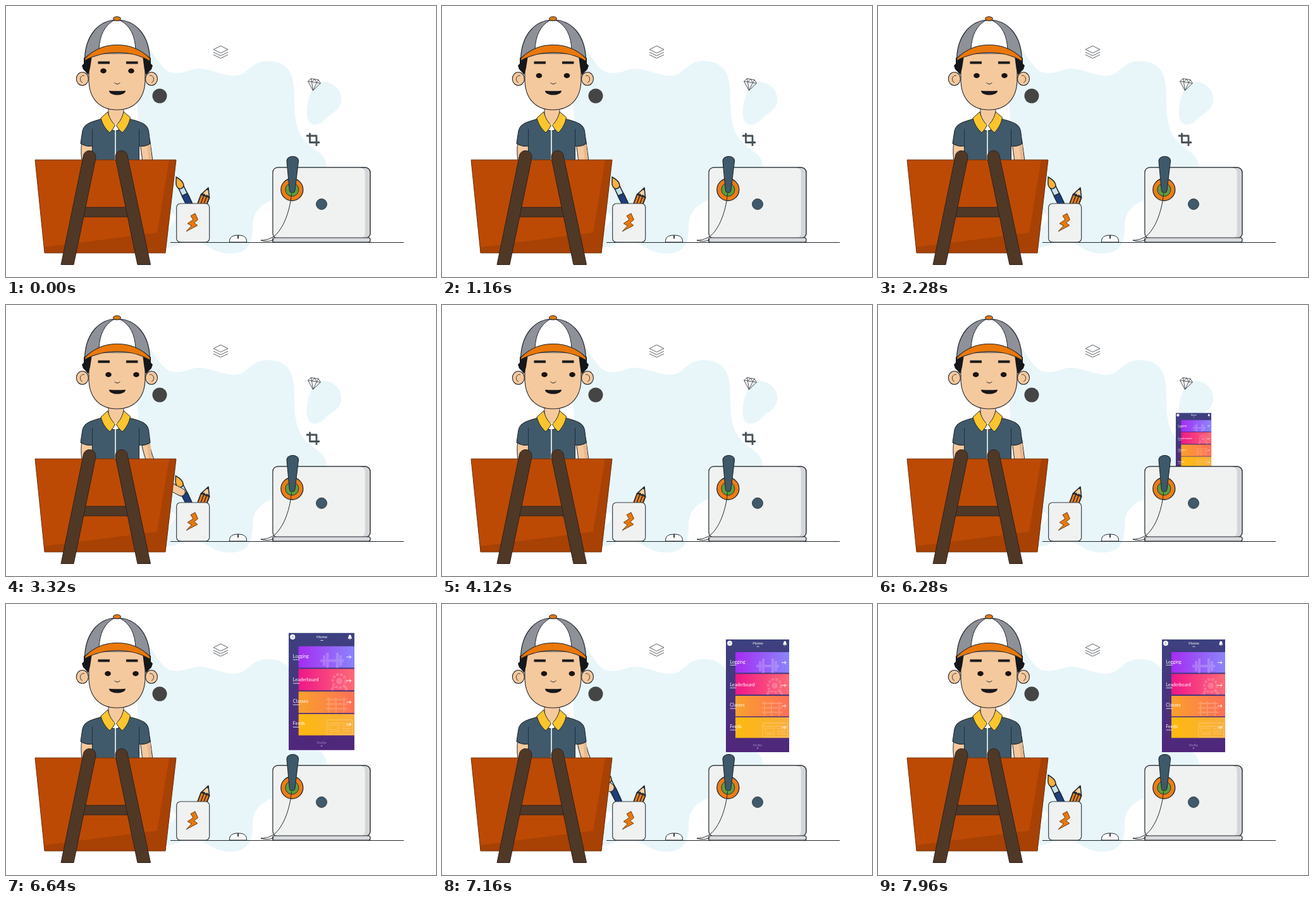
Recreate the animation shown at these times as an HTML page with a canvas. Size 680x428 px, loop 8 s.

```html
<!DOCTYPE html>
<html lang="en">
<head>
<meta charset="utf-8">
<title>Designer at work</title>
<style>
html, body { margin: 0; width: 100%; height: 100%; overflow: hidden; background: #fff; }
canvas { display: block; width: 680px; height: 428px; }
</style>
</head>
<body>
<canvas id="stage"></canvas>
<script>
const LOOP = 8000;
const canvas = document.getElementById('stage');
const ctx = canvas.getContext('2d');
const dpr = window.devicePixelRatio || 1;
canvas.width = 680 * dpr;
canvas.height = 428 * dpr;

const INK = '#22282d', SKIN = '#f5c99e', SKIN_DARK = '#e9b98d', SHIRT = '#405a6b',
  ORANGE = '#ea780a', BROWN = '#503827', PAPER = '#f0f2f1', SKY = '#e8f6fa';

const ease = p => (1 - Math.cos(Math.PI * p)) / 2;
const ramp = (t, a, b) => ease(Math.min(1, Math.max(0, (t - a) / (b - a))));
const mix = (a, b, p) => a + (b - a) * p;

// Eased value between [time, value] keys
function keyed(keys, t) {
  let i = 0;
  while (i < keys.length - 2 && t >= keys[i + 1][0]) i++;
  const [t0, a] = keys[i], [t1, b] = keys[i + 1];
  return mix(a, b, ramp(t, t0, t1));
}

function paint(path, fill, stroke, width = 1) {
  if (fill) { ctx.fillStyle = fill; ctx.fill(path); }
  if (stroke) { ctx.strokeStyle = stroke; ctx.lineWidth = width; ctx.stroke(path); }
}
const shape = (d, fill, stroke, width) => paint(new Path2D(d), fill, stroke, width);

function oval(x, y, rx, ry, fill, stroke, width) {
  const p = new Path2D();
  p.ellipse(x, y, rx, ry, 0, 0, Math.PI * 2);
  paint(p, fill, stroke, width);
}
function box(x, y, w, h, r, fill, stroke, width) {
  const p = new Path2D();
  p.roundRect(x, y, w, h, r);
  paint(p, fill, stroke, width);
}
function at(x, y, angle, draw) {
  ctx.save();
  ctx.translate(x, y);
  ctx.rotate(angle);
  draw();
  ctx.restore();
}
function gradient(x0, y0, x1, y1, a, b) {
  const g = ctx.createLinearGradient(x0, y0, x1, y1);
  g.addColorStop(0, a);
  g.addColorStop(1, b);
  return g;
}

function backdrop() {
  shape('M210 58 C237 64 240 105 268 106 C286 106 292 99 306 99 C328 100 345 112 364 110' +
    ' C384 108 386 87 414 87 C445 87 456 106 456 140 C455 190 464 206 480 220' +
    ' C496 232 512 240 506 262 L440 302 C408 307 391 322 390 346 C390 372 386 391 354 391' +
    ' C322 390 322 373 294 373 C270 373 268 384 250 380 C246 350 268 346 268 334' +
    ' C268 322 225 320 213 230 L207 150 Z', SKY);
  shape('M504 120 C520 121 533 136 530 151 C527 166 515 168 505 179 C494 190 478 192 476 174' +
    ' C474 155 482 121 504 120 Z', SKY);

  shape('M339.5 63 L351 68.7 L339.5 74.3 L328 68.7 Z M328 73 L339.5 78.5 L351 73' +
    ' M328 77 L339.5 82.5 L351 77', null, '#4b5257', 0.9);
  oval(243, 142, 11.5, 11.5, '#454545');
  at(487, 123.5, 0.16, () => shape('M-6 -8 L6 -8 L10 -3 L0 10 L-10 -3 Z M-10 -3 L10 -3' +
    ' M-6 -8 L-4 -3 L0 10 L4 -3 L6 -8 M-4 -3 L0 -8 L4 -3', null, '#454b50', 0.9));
  shape('M480.5 200.5 V215.5 H496 M475 205 H491 V221', null, '#475258', 2.8);
}

function dumbbell() {
  shape('M497 98 H533 M503 90 V106 M508 86 V109 M523 86 V109 M528 90 V106', null, '#fff', 4);
}
function medal() {
  ctx.setLineDash([4, 2]);
  oval(526, 129, 10, 10, null, '#fff', 4);
  ctx.setLineDash([]);
  oval(526, 129, 5, 5, '#fff');
  shape('M518 137 L514 143 M534 137 L538 143', null, '#fff', 4);
}
function planner() {
  shape('M506 157 H538 M506 164 H538 M506 171 H538 M510 154 V177 M521 154 V177 M533 154 V177', null, '#fff', 2);
}
function journal() {
  box(507, 188, 39, 22, 1, null, '#fff', 1.3);
  shape('M507 193 H546 M530 197 H543 M530 201 H543 M530 205 H543 M511 206 H526', null, '#fff', 1.3);
  box(511, 196, 14, 7, 0, null, '#fff', 1.3);
}

const CARDS = [
  ['Logging', 76, 93.5, '#a52cf2', '#8b85fb', dumbbell],
  ['Leaderboard', 110.5, 129.5, '#ef1688', '#ff6b76', medal],
  ['Classes', 145, 162, '#f9a12c', '#ff7058', planner],
  ['Feeds', 179, 196, '#fdb90f', '#f9ae3e', journal]
];

function label(text, x, y, size, color, align = 'left') {
  ctx.font = size + 'px Lato, sans-serif';
  ctx.textAlign = align;
  ctx.fillStyle = color;
  ctx.fillText(text, x, y);
}

// Rises from behind the laptop, overshoots, then settles
function phone(t) {
  const s = t < 6520 ? 1.115 * ramp(t, 6040, 6520) : mix(1.115, 1, ramp(t, 6520, 6720));
  if (s < 0.01) return;
  ctx.save();
  ctx.translate(499, 145 - 172 * (s - 1));
  ctx.scale(s, s);
  ctx.translate(-499, -145);
  box(449, 56, 100, 178, 0, gradient(0, 56, 0, 234, '#3d4180', '#50267b'));
  oval(455, 62, 3.9, 3.9, '#fff');
  shape('M453.4 61 H456.6 M453.4 63 H456.6', null, '#777aa8', 0.7);
  label('Home', 499.5, 64, 6.2, '#fff', 'center');
  shape('M497.5 67.2 H501.5', null, '#fff', 0.8);
  shape('M539 64.5 C540.5 63 539.5 59 542.2 58.6 C545 59 544 63 545.5 64.5 Z M541.3 65.3 H543.2 L542.2 66.5 Z', '#fff');
  for (const [name, top, base, a, b, icon] of CARDS) {
    box(464, top, 85, 32.5, 0, gradient(464, 0, 549, 0, a, b));
    ctx.globalAlpha = 0.2;
    icon();
    ctx.globalAlpha = 1;
    label(name, 455.3, base, 7.2, '#fff');
    shape(`M455.5 ${base + 3} h10`, null, '#fff', 0.8);
    shape(`M537 ${base - 1} h7 m-2.5 -2.5 l2.5 2.5 l-2.5 2.5`, null, '#fff', 0.9);
  }
  label('Profile', 499, 224.5, 5.2, '#9784bd', 'center');
  shape('M497.3 227 H500.7 L499 229 Z', '#a99bc8');
  ctx.restore();
}

function laptop() {
  box(422, 255, 154, 112, 8, '#d3d5d9', INK, 1.4);
  box(422.7, 255.7, 145, 110.6, 7, PAPER);
  box(421.5, 366, 154.5, 7.2, 3, '#d9dbde', INK, 1.2);
  oval(499, 313, 8.5, 8.5, SHIRT, INK, 0.8);
  oval(452.3, 290, 17.5, 17.5, '#ee7c16', INK, 1.3);
  oval(452.3, 290, 10.5, 10.5, '#5c9e40', INK, 0.9);
  shape('M444 245 C444 235 463 235 462.5 245 L457 291 C456 296 449 296 448.3 291 Z', '#3e596a', INK, 1.1);
  shape('M451.5 296 C449 327 436 358 420 366 C414 369 409 370 403 370 C410 372.5 417 372 424 369', null, INK, 1);
}

function brush(dx, dy) {
  at(269 + dx, 270 + dy, -0.454, () => {
    shape('M-4 24 L4 24 L5 34 C5 55 3 75 0 90 C-3 75 -5 55 -5 34 Z', '#1d3f7d', INK, 1.6);
    shape('M-4.5 18 H4.5 L4.5 31 H-4.5 Z', '#c7e1ef', INK, 1.5);
    shape('M0 0 C3 5 6.5 9 5.5 15 C5 19 3 20 0 20 C-3 20 -5 19 -5.5 15 C-6.5 9 -2 6 0 0 Z', '#fbb13c', INK, 1.5);
  });
}

function pencil() {
  at(320, 287, 0.36, () => {
    shape('M-7 14 V50 H7 V14 Z', '#ee7f17', INK, 1.8);
    shape('M-2.3 14 V50 M2.3 14 V50', null, INK, 1.5);
    shape('M0 0 L7 14 L2.3 12 L0 14 L-2.3 12 L-7 14 Z', '#f8cf9e', INK, 1.6);
    shape('M0 0 L2 4 H-2 Z', INK);
  });
}

function cup() {
  box(269.7, 312, 52, 61, 6, PAPER, '#3a4146', 1.2);
  shape('M299 327.5 L292 331.5 L296 337.5 L287 343.5 L293.5 347 L285 356 L303 346.5 L297.5 342.5 L303.5 337.5 Z',
    ORANGE, '#5a3415', 0.9);
}

function mouse() {
  shape('M353.5 373 C353 365 358 362 367 362 C376 362 381 365 380.5 373 Z', '#fafafa', INK, 1);
  shape('M367 362 V367.5', null, INK, 1.8);
}

// How far the hand has reached toward the cup, 0 to 1
const reach = t => t < 5000
  ? ramp(t, 2500, 3200) - ramp(t, 3260, 4080)
  : ramp(t, 6660, 7400) - ramp(t, 7430, 7920);

function arm(r) {
  const x = mix(226, 278, r), y = mix(270, 296, r);
  const p = new Path2D();
  p.moveTo(219.5, 212);
  p.quadraticCurveTo(mix(224, 228, r), mix(240, 275, r), x, y);
  ctx.lineCap = 'round';
  paint(p, null, INK, mix(17, 13, r));
  paint(p, null, SKIN, mix(15, 11, r));
  ctx.lineCap = 'butt';
  shape('M223 220 L228.5 219 L230.5 243 L226 243 Z', SKIN_DARK);
}

function body() {
  shape('M120 214 C118 226 119 240 121 252 H138 V214 Z', SKIN, INK, 1);
  shape('M162 155 V188 H186 V155 Z', SKIN, INK, 0.9);
  shape('M164 186 L173 201 L183 186 Z', '#fff');
  shape('M152 178 C140 182 124 184 121 197 L118 217 C124 221 130 222 136.5 221 V250 H210.5 V221' +
    ' C217 222 223 221 228 217 L225.5 197 C223 184 207 182 194 178 L181 194 C176 198 170 198 165 194 Z', SHIRT, INK, 1.1);
  shape('M136.5 221 V194 M210.5 221 V194', null, INK, 0.9);
  shape('M168 192 Q173 199 179 192 L173.5 186 Z', '#fff');
  shape('M173 196 V243', null, '#eef2f4', 1.7);
  shape('M161 167 L150 177 C152 185 156 193 164 200 C168 196 171 192 172.5 188 C167 183 163 176 161 167 Z', '#fcc52e', INK, 1);
  shape('M186 167 L196.5 176 C195 185 191 193 184 200 C179 196 176 192 174.5 188 C180 183 184 176 186 167 Z', '#fcc52e', INK, 1);
}

function mouth(open) {
  const w = mix(13, 14, open), top = mix(133.7, 133, open), drop = mix(7, 15, open);
  const x0 = 176 - w, x1 = 176 + w;
  const p = new Path2D(`M${x0} ${top} Q176 ${top + 1} ${x1} ${top}` +
    ` C${x1} ${top + drop * 1.3} ${x0} ${top + drop * 1.3} ${x0} ${top} Z`);
  paint(p, '#17171a');
  if (open < 0.05) return;
  ctx.save();
  ctx.clip(p);
  box(167, top + 0.8, 19, 5.5 * open, 1, '#fff');
  ctx.restore();
}

function head(t) {
  oval(120.8, 115, 9.5, 10.5, SKIN, INK, 1.1);
  oval(230, 115, 9.5, 10.5, SKIN, INK, 1.1);
  shape('M124 110 C117 108 115 119 121 121 M227 110 C234 108 236 119 230 121', null, INK, 0.9);
  shape('M131 75 H220 V116 C220 145 204 164 175.5 164 C147 164 131 145 131 116 Z', SKIN, INK, 1.1);
  shape('M123 82 L136 78 L133 98 L130 109 L126 104 L122 100 L120 94 L123 91 Z', '#15171a');
  shape('M229 82 L216 78 L218.5 98 L221 109 L226 104 L230 100 L232 94 L229 91 Z', '#15171a');

  shape('M124.5 83 C126 47 146 22 175.5 22 C206 22 226 47 227.5 83' +
    ' C212 71 194 67 176 67 C158 67 140 71 124.5 83 Z', '#8f9199', INK, 1.2);
  shape('M170 23 C156 31 148 46 147 69 H205 C204 46 196 31 181 23 Z', '#fff', INK, 1);
  oval(175.5, 20, 6, 3.2, '#e07913', INK, 1);
  shape('M124.5 83 C140 67 158 61.5 176 61.5 C194 61.5 212 67 228 83 L227.5 87' +
    ' C211 77 194 73.5 176 73.5 C158 73.5 141 77 125 86 Z', ORANGE, INK, 1.1);

  shape('M145.5 87.6 H164 V91.6 H145.5 Z M190 87.6 H208.5 V91.6 H190 Z', '#1a1a1c');
  const x = keyed(EYE_X, t), y = mix(102.5, 110, ramp(t, 0, 520));
  oval(x, y, 4.8, 3.9, '#1a1412');
  oval(x + 44, y, 4.8, 3.9, '#1a1412');
  shape('M171.5 121 Q176 125.5 180.5 121', null, INK, 1);
  mouth(ramp(t, 4960, 5240) - ramp(t, 5440, 5700));
}

const EYE_X = [[0, 154], [680, 154], [1080, 153.4], [1480, 154], [2280, 156], [2400, 156],
  [3100, 162], [4120, 162], [4760, 154], [6200, 154], [6600, 161], [7400, 161.5], [8000, 162]];

function desk() {
  shape('M46 243 H269 L252 390 H61 Z', '#bc4a04');
  shape('M258 243 H269 L252 390 H61 L60 381 L239 358 Z', '#a84104');
  shape('M46 243 H269 L252 390 H61 Z', null, '#713008', 1);
  box(122, 318, 70, 15, 0, BROWN, '#2d211c', 1);
  shape('M122.5 236 C125 225 143 226 142 240 L107 408.5 H87 Z', BROWN, '#2d211c', 1);
  shape('M173 240 C172 226 190 225 192 236 L228.5 408.5 H208 Z', BROWN, '#2d211c', 1);
}

function draw(t) {
  ctx.setTransform(dpr, 0, 0, dpr, 0, 0);
  ctx.fillStyle = '#fff';
  ctx.fillRect(0, 0, 680, 428);
  ctx.lineJoin = 'round';
  backdrop();
  shape('M260 373.5 H629', null, INK, 1);
  phone(t);
  laptop();

  const r = reach(t);
  const held = t > 3230 && t < 7415 ? 1 - r : 0;
  const bob = t > 4920 && t < 5720 ? 0.6 * Math.sin((t - 4920) / 400 * Math.PI) : 0;
  brush(-54 * held, -26 * held);
  arm(r);
  pencil();
  cup();
  mouse();
  at(0, bob, 0, () => { body(); head(t); });
  desk();
}

const start = performance.now();
function tick() {
  draw((performance.now() - start) % LOOP);
  requestAnimationFrame(tick);
}
tick();
</script>
</body>
</html>
```
